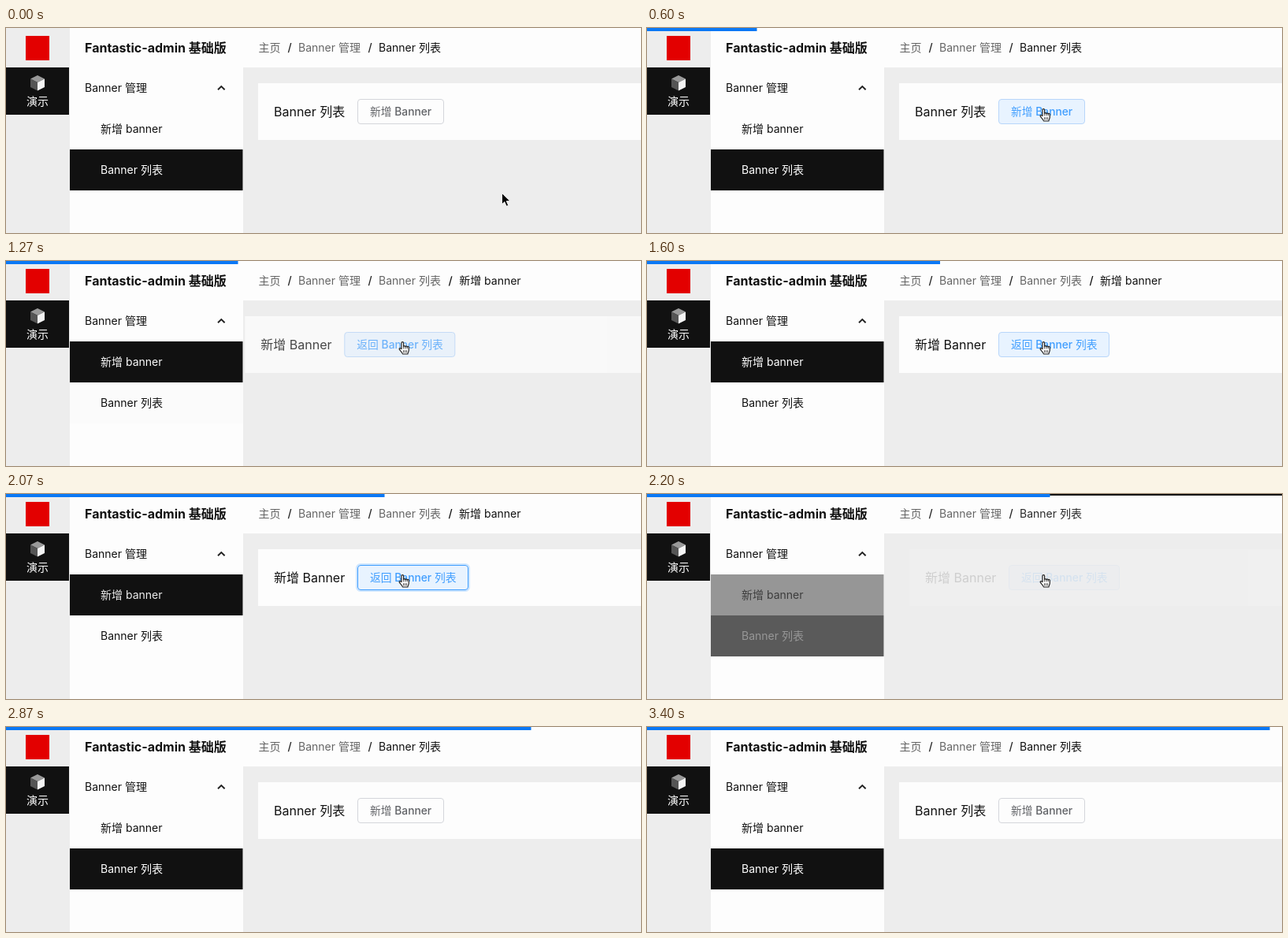
An HTML page for the animation above (3.47 s loop, 806 by 260 pixels).

```html
<!DOCTYPE html>
<html lang="zh-CN">
<head>
<meta charset="utf-8">
<title>Fantastic-admin</title>
<style>
html, body { margin: 0; width: 100%; height: 100%; overflow: hidden; background: #ededed; }
svg { display: block; width: 806px; height: 260px; font: 14px Inter, "Noto Sans CJK SC", "Noto Sans CJK", sans-serif; }
text { white-space: pre; }
</style>
</head>
<body>
<svg viewBox="0 0 806 260">
  <rect width="806" height="260" fill="#ededed"/>

  <g id="card">
    <rect x="320" y="70" width="520" height="72" fill="#fdfdfd"/>
    <text id="title" x="340" y="112" font-size="16" fill="#111"></text>
    <rect id="glow" x="445" y="89" height="34" rx="5" fill="none" stroke="#409eff" stroke-opacity=".25" stroke-width="2"/>
    <rect id="btn" x="446.5" y="90.5" height="31" rx="3.5"/>
    <text id="label" x="462" y="111" font-size="13.8" font-weight="500"></text>
  </g>

  <rect x="301" width="505" height="50" fill="#fdfdfd"/>
  <g fill="#666">
    <text x="320.5" y="30">主页</text>
    <text x="371" y="30">Banner 管理</text>
    <text id="crumb" x="473" y="30">Banner 列表</text>
  </g>
  <g fill="#222" text-anchor="middle" font-weight="500">
    <text x="360" y="30">/</text>
    <text x="462" y="30">/</text>
  </g>
  <g id="extra" fill="#111">
    <text x="564" y="30" text-anchor="middle" font-weight="500">/</text>
    <text x="575" y="30">新增 banner</text>
  </g>

  <rect y="50" width="80" height="60" fill="#111"/>
  <path d="M40 60l9 4.5-9 4.5-9-4.5z" fill="#999"/>
  <path d="M31 64.5l9 4.5v10.5l-9-4.5z" fill="#555"/>
  <path d="M49 64.5l-9 4.5v10.5l9-4.5z" fill="#f4f4f4"/>
  <text x="40" y="98" text-anchor="middle" fill="#fff">演示</text>
  <rect x="25" y="10" width="30" height="31" fill="#e30000"/>

  <rect x="81" width="220" height="260" fill="#fdfdfd"/>
  <text x="100" y="31" font-size="16" font-weight="700" fill="#111">Fantastic-admin 基础版</text>
  <text x="100" y="81" fill="#111">Banner 管理</text>
  <path d="M269 78.2l4.3-4.2 4.3 4.2" fill="none" stroke="#222" stroke-width="1.9"/>
  <rect id="addBg" x="81" y="102" width="219.5" height="52"/>
  <text id="addText" x="120" y="133">新增 banner</text>
  <rect id="listBg" x="81" y="154" width="219.5" height="52"/>
  <text id="listText" x="120" y="185">Banner 列表</text>

  <rect id="load" height="2" fill="#0f0f0f"/>
  <rect id="bar" height="4" fill="#0a78f5"/>

  <path id="arrow" d="M0 0v14l3.3-3 2.4 5.4 2.4-1-2.4-5.3h4.6z" fill="#000" stroke="#fff" stroke-width=".8"/>
  <g id="hand" stroke="#222" stroke-linejoin="round" stroke-linecap="round">
    <path d="M4.5 9.5V2a1.3 1.3 0 0 1 2.6 0v4.5a1.2 1.2 0 0 1 2.3.2a1.2 1.2 0 0 1 2.3.4a1.1 1.1 0 0 1 2.1.6v3.3c0 2-1.2 2.8-1.4 5h-6.4c-.4-2-2.8-3.8-4-5.6c-.9-1.3.6-2.4 1.6-1.5z" fill="#fff" stroke-width="1.2"/>
    <path d="M7.1 6.5v2.5M9.4 6.7v2.3M11.7 7.1v2M7 11.5v2.5M9 11.5v2.5M11 11.5v2.5" fill="none" stroke-width=".8"/>
  </g>
</svg>
<script>
const LOOP = 3470, STEPS = 52, HALF = 1800;
const el = {};
document.querySelectorAll('[id]').forEach(e => el[e.id] = e);

const set = (e, attrs) => { for (const k in attrs) e.setAttribute(k, attrs[k]); };
const ramp = (t, start, dur) => Math.min(1, Math.max(0, (t - start) / dur));
const lerp = (a, b, p) => a + (b - a) * p;
const mix = (a, b, p) => `rgb(${a.map((v, i) => Math.round(lerp(v, b[i], p)))})`;
const grey = v => `rgb(${[v, v, v].map(Math.round)})`;

// CSS "ease": cubic-bezier(.25, .1, .25, 1)
function ease(x) {
  if (x <= 0 || x >= 1) return x <= 0 ? 0 : 1;
  const curve = (a, b, u) => 3 * a * u * (1 - u) ** 2 + 3 * b * u * u * (1 - u) + u ** 3;
  let lo = 0, hi = 1;
  for (let i = 0; i < 24; i++) {
    const mid = (lo + hi) / 2;
    if (curve(.25, .25, mid) < x) lo = mid; else hi = mid;
  }
  return curve(.1, 1, lo);
}
const eased = (t, start, dur) => ease(ramp(t, start, dur));

// Both page switches share one timeline; the second is delayed.
const phase = (t, delay) => t < HALF ? t : t - delay;

function drawMenu(t) {
  const p = phase(t, 1100), back = t >= HALF;
  const [on, off] = back ? ['list', 'add'] : ['add', 'list'];
  const paint = (name, bg, ink) => {
    set(el[name + 'Bg'], { fill: grey(bg) });
    set(el[name + 'Text'], { fill: grey(ink) });
  };
  paint(on, lerp(253, 17, eased(p, 978, 300)), lerp(17, 255, eased(p, 1002, 300)));
  paint(off, lerp(17, 253, eased(p, 1002, 300)), lerp(255, 17, eased(p, 945, 300)));
}

function drawCard(t) {
  const p = phase(t, 1050), entered = p >= 1180;
  const adding = entered !== (t >= HALF);
  const leave = ramp(p, 1020, 150);
  const dx = entered ? -20 * (1 - eased(p, 1242, 200)) : 20 * leave ** 3;
  const alpha = entered ? eased(p, 1180, 200) : 1 - leave;
  set(el.card, { transform: `translate(${dx} 0)`, opacity: alpha });

  el.title.textContent = adding ? '新增 Banner' : 'Banner 列表';
  el.label.textContent = adding ? '返回 Banner 列表' : '新增 Banner';
  const width = adding ? 141 : 110;
  const hover = ramp(t, 420, 100) * (1 - ramp(t, 2450, 120));
  const click = phase(t, 1070);
  const pressed = click >= 930 && click < 1050;
  set(el.btn, {
    width: width - 1,
    fill: mix([253, 253, 253], [232, 243, 255], hover),
    stroke: pressed ? '#409eff' : mix([212, 214, 219], [184, 214, 250], hover)
  });
  set(el.glow, { width: width + 2, opacity: pressed ? 1 : 0 });
  set(el.label, { fill: mix([96, 98, 102], [64, 158, 255], hover) });
}

function drawCrumbs(t) {
  const p = eased(t, 1000, 300), rest = 1 - p;
  const shown = t < 2110;
  const skew = -Math.tan(50 * Math.PI / 180) * rest;
  set(el.extra, {
    opacity: shown ? p : 0,
    transform: `translate(${606 + 31 * rest} 25) matrix(1 0 ${skew} 1 0 0) translate(-606 -25)`
  });
  const dim = ramp(t, 1070, 130) * (1 - ramp(t, 2110, 130));
  set(el.crumb, { fill: grey(lerp(17, 102, dim)) });
}

function drawBars(t, step) {
  const p = phase(t, 1080);
  set(el.load, { width: 806 * ramp(p, 990, 80), opacity: 1 - ramp(p, 1130, 100) });
  set(el.bar, { width: step * 15.5 });
}

function pointerAt(t) {
  if (t < 2270) {
    const u = ramp(t, 130, 400), p = u * u * (3 - 2 * u);
    return [lerp(629, 503, p), lerp(209, 102, p)];
  }
  if (t <= 2470) {
    const p = ramp(t, 2270, 200) ** 2;
    return [lerp(503, 658.5, p), lerp(102, 77.5, p)];
  }
  const p = ramp(t, 2470, 130);
  return [lerp(658.5, 745, p), lerp(77.5, -22, p)];
}

function drawPointer(t) {
  const [x, y] = pointerAt(t);
  const over = x > 446 && x < 556 && y > 90 && y < 122;
  set(el.arrow, { transform: `translate(${x + .5} ${y + .5})`, opacity: over ? 0 : 1 });
  set(el.hand, { transform: `translate(${x - 5.5} ${y})`, opacity: over ? 1 : 0 });
}

function draw(now) {
  const step = Math.min(STEPS - 1, Math.floor((now % LOOP + 4) / LOOP * STEPS));
  const t = Math.round(step * 20 / 3) * 10;
  drawMenu(t);
  drawCard(t);
  drawCrumbs(t);
  drawBars(t, step);
  drawPointer(t);
}

let origin;
function tick(now) {
  origin ??= now;
  draw(Math.max(0, now - origin));
  requestAnimationFrame(tick);
}
draw(0);
requestAnimationFrame(tick);
</script>
</body>
</html>
```
